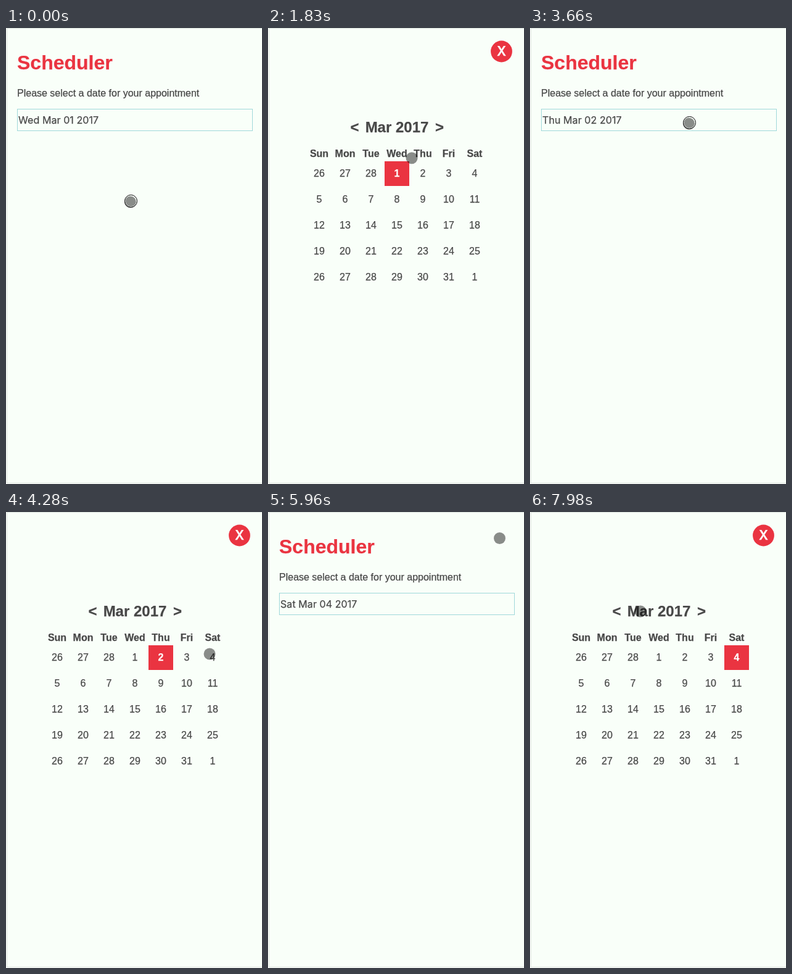
These frames come from a looping animation (415x739 px, 8000 ms). An HTML page:

```html
<!DOCTYPE html>
<html lang="en">
<head>
<meta charset="utf-8">
<title>Scheduler</title>
<style>
  html, body { margin: 0; width: 100%; height: 100%; overflow: hidden; background: #fff; }
  svg { display: block; font: 16px "Liberation Sans", Arial, sans-serif; color: #484848; }
  text { fill: currentColor; stroke: currentColor; stroke-width: .25; }
  .bold { font-weight: bold; }
  .red { color: #ea3441; fill: currentColor; }
  .white { color: #fff; }
  .middle { text-anchor: middle; }
  .system { font-family: Inter, sans-serif; }
</style>
</head>
<body>
<svg width="415" height="739" viewBox="0 0 415 739">
  <rect x="1.5" y=".5" width="420" height="737" fill="#f9fff9" stroke="#dde5de"/>
  <g id="form">
    <text class="bold red" x="18" y="67" font-size="32">Scheduler</text>
    <text x="18" y="111">Please select a date for your appointment</text>
    <rect x="18.5" y="131.5" width="381" height="35" fill="none" stroke="#9fd8da"/>
    <text id="date" class="system" x="20" y="155" letter-spacing=".08"></text>
  </g>
  <g id="calendar" class="middle">
    <circle class="red" cx="378.5" cy="38" r="17.4"/>
    <text class="system white" x="378.5" y="45" font-size="21" font-weight="600">X</text>
    <g class="bold" font-size="24">
      <text x="140.5" y="169">&lt;</text>
      <text x="209" y="169">Mar 2017</text>
      <text x="278" y="169">&gt;</text>
    </g>
    <rect id="selection" class="red" y="216" width="40" height="40"/>
  </g>
  <g id="cursor">
    <circle r="9.5" fill="#000" fill-opacity=".45"/>
    <g id="ring" transform="translate(1 -1.5)" fill="none">
      <circle r="9.1" stroke="#fff" stroke-opacity=".7"/>
      <circle r="10" stroke="#000"/>
    </g>
  </g>
</svg>
<script>
const LOOP = 8000;
const PRESS = 90;
const WEEKDAYS = ['Sun', 'Mon', 'Tue', 'Wed', 'Thu', 'Fri', 'Sat'];
const byId = id => document.getElementById(id);
const [form, calendar, date, selection, cursor, ring] =
  ['form', 'calendar', 'date', 'selection', 'cursor', 'ring'].map(byId);

const columnX = column => 83 + 42 * column;

function addText(text, x, y, className = '') {
  const node = document.createElementNS('http://www.w3.org/2000/svg', 'text');
  node.setAttribute('x', x);
  node.setAttribute('y', y);
  node.setAttribute('class', className);
  node.textContent = text;
  calendar.append(node);
  return node;
}

WEEKDAYS.forEach((name, column) => addText(name, columnX(column), 209, 'bold'));
const cells = Array.from({ length: 35 }, (_, i) => {
  const day = new Date(2017, 1, 26 + i).getDate();
  return addText(day, columnX(i % 7), 241 + 42 * Math.floor(i / 7));
});

const smooth = p => p * p * (3 - 2 * p);
const mix = (a, b, p) => a + (b - a) * p;

// The whole state at time t, told as one session of gliding and clicking.
function stateAt(t) {
  const state = { x: 201.5, y: 282, day: 1, open: false, pressed: t < 60 };

  function glide(from, to, x, y) {
    const p = smooth(Math.min(1, Math.max(0, (t - from) / (to - from))));
    state.x = mix(state.x, x, p);
    state.y = mix(state.y, y, p);
  }

  // Each click opens or closes the calendar on release.
  function click(time, day = state.day) {
    if (t < time) return;
    state.pressed = t < time + PRESS;
    if (state.pressed) return;
    state.open = !state.open;
    state.day = day;
  }

  glide(40, 840, 188.5, 155);
  click(1260);
  glide(1600, 1990, 258.5, 242.5);
  click(2380, 2);
  glide(2850, 3480, 257.5, 155);
  click(3660);
  glide(3790, 4370, 335, 235);
  click(4480, 4);
  glide(4600, 4960, 335.5, 147);
  click(5050);
  glide(5150, 5570, 375.5, 42.5);
  click(5870);
  glide(6110, 6570, -24, 61.5);
  glide(6600, 6800, -24, 36.5);
  glide(6806, 7460, 194.5, 167.5);
  click(7610);
  glide(7800, 7980, 179, 161);
  return state;
}

function show(node, visible) {
  node.style.display = visible ? '' : 'none';
}

function draw(t) {
  const { x, y, day, open, pressed } = stateAt(t);
  const column = day + 2;
  show(form, !open);
  show(calendar, open);
  show(ring, pressed);
  date.textContent = `${WEEKDAYS[column]} Mar 0${day} 2017`;
  selection.setAttribute('x', columnX(column) - 20);
  cells.forEach((cell, i) => cell.setAttribute('class', i === column ? 'bold white' : ''));
  cursor.setAttribute('transform', `translate(${x} ${y})`);
}

const began = performance.now();
function tick() {
  draw((performance.now() - began) % LOOP);
  requestAnimationFrame(tick);
}
tick();
</script>
</body>
</html>
```
